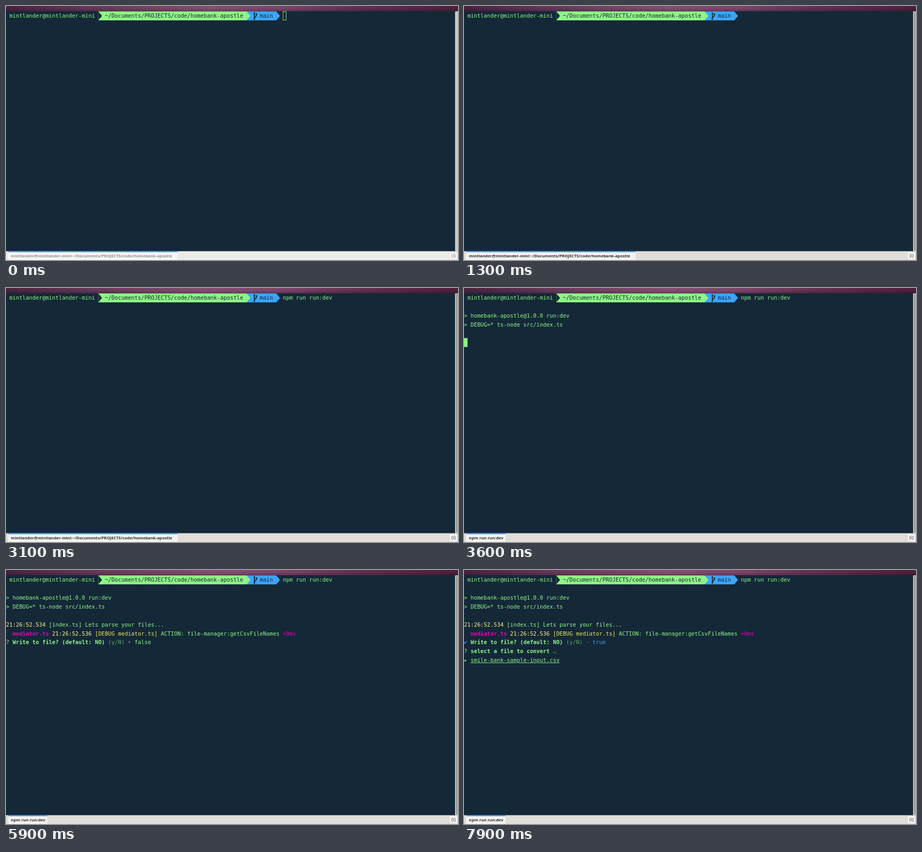
An HTML page that plays this animation: 853 by 480 pixels, repeating every 8 s.

```html
<!DOCTYPE html>
<html lang="en">
<head>
<meta charset="utf-8">
<title>Terminal</title>
<style>
  html, body { margin: 0; width: 100%; height: 100%; overflow: hidden; background: #142838; }
  /* Laid out at 1920 px wide, then scaled to the stage. */
  #stage { position: absolute; top: 0; left: 0; width: 1920px; height: 1081px; overflow: hidden;
    transform: scale(calc(853 / 1920)); transform-origin: 0 0; }
  #stage div, #stage svg { position: absolute; top: 0; left: 0; box-sizing: border-box; }
  #stage #wall { width: 1920px; height: 22px;
    background: linear-gradient(#0000 40%, #0003),
      linear-gradient(90deg, #482340, #6a3a5c 22%, #874c73 45%, #7d456a 60%, #63304f 78%, #4e1f3b); }
  #stage #term { top: 23px; width: 1920px; height: 1020px; background: #142838; color: #8ff586;
    font: 23.25px/38px "DejaVu Sans Mono", monospace; white-space: pre; }
  .row { height: 38px; }
  .seg { height: 38px; color: #142631; }
  .tip { width: 16px; height: 38px; clip-path: polygon(0 0, 100% 50%, 0 100%); }
  #cursor { width: 15px; height: 38px; background: #8ff586; }
  .blur #cursor { background: none; border: 2px solid #8ff586; }
  .time { color: #fff688; }
  .debug { color: #e9e75c; }
  .pink { color: #e600b4; }
  .blue { color: #3ba5ff; }
  .dim { color: #5f9f69; }
  #stage #scroll { left: 1908px; top: 23px; width: 12px; height: 1020px; background: #e6e4e1; }
  #stage #thumb { left: 4px; top: 2px; width: 6px; height: 1016px; border-radius: 3px; background: #858585; }
  .blur #thumb { background: #bebcba !important; }
  #stage #bar { top: 1043px; width: 1920px; height: 38px; background: #e1deda; }
  #stage.blur #bar { background: #edebe8; }
  #stage #tab { left: 9px; height: 38px; padding-left: 12px; border-top: 4px solid #3584d6;
    background: #f3f2f1; color: #2c2c2c; white-space: pre;
    font: bold 17.4px/32px "Open Sans", "Noto Sans", sans-serif; }
  #stage.blur #tab { color: #8e8e8c; background: #f7f6f5; }
  #stage #icon { left: 1883px; top: 2px; color: #666; }
  #stage.blur #icon { color: #999; }
</style>
</head>
<body>
<div id="stage">
  <div id="wall"></div>
  <div id="term">
    <div class="seg" style="left:392px;width:630px;background:#8ff586"></div>
    <div class="seg" style="left:1022px;width:126px;background:#3ba5ff"></div>
    <div class="tip" style="left:392px;background:#142838"></div>
    <div class="tip" style="left:1022px;background:#8ff586"></div>
    <div class="tip" style="left:1148px;background:#3ba5ff"></div>
    <div class="row" style="left:14px">mintlander@mintlander-mini</div>
    <div class="seg" style="left:420px">~/Documents/PROJECTS/code/homebank-apostle</div>
    <div class="seg" style="left:1078px">main</div>
    <svg style="left:1050px" width="18" height="38" fill="none" stroke="#142631" stroke-width="4">
      <path d="M5 5V35M14 9V15Q14 20 5 26"/>
      <path d="M2 7H8M2 32H8M11 11H17" stroke-width="5"/>
    </svg>
    <div id="text"></div>
    <div id="cursor"></div>
  </div>
  <div id="scroll"><div id="thumb"></div></div>
  <div id="bar">
    <div id="tab"></div>
    <svg id="icon" width="35" height="35" fill="none" stroke="currentColor" stroke-width="2">
      <rect x="1" y="1" width="33" height="33" rx="4" fill="#f8f7f6" stroke="#cfccc8"/>
      <path d="M11 25V11H25V25M11 25H15M21 25H25M18 15V22M14.5 18.5H21.5"/>
    </svg>
  </div>
</div>
<script>
const LOOP = 8000, CELL = 14, LINE = 38, PROMPT = 84;
const FOCUS = 300, ENTER = 3300;
const $ = id => document.getElementById(id);
const span = (cls, s) => `<span class="${cls}">${s}</span>`;
const row = (n, s, col = 0) =>
  `<div class="row" style="top:${n * LINE}px;left:${col * CELL}px">${s}</div>`;

const typed = s => row(0, s, PROMPT);
const command = typed("npm run run:dev");
const header = command + row(2, "> homebank-apostle@1.0.0 run:dev") +
  row(3, "> DEBUG=* ts-node src/index.ts");
const log = header +
  row(5, span("time", "21:26:52.534") + " [index.ts] Lets parse your files...") +
  row(6, "  " + span("pink", "<b>mediator.ts</b>") + span("time", " 21:26:52.536 ") +
    span("debug", "[DEBUG mediator.ts]") + " ACTION: file-manager:getCsvFileNames " +
    span("pink", "+0ms"));
const question = (mark, sep, answer) => row(7,
  `${mark} <b>Write to file? (default: NO)</b> ${span("dim", "(y/N) " + sep)} ${answer}`);
const choice = row(8, "? <b>select a file to convert</b> " + span("dim", "…")) +
  row(9, "▸ <u>smile-bank-sample-input.csv</u>");

// Start time, screen text, cursor cell [column, row] or none
const steps = [
  [0, "", [PROMPT, 0]],
  [FOCUS, "", [PROMPT, 0]],
  [1500, typed("clear"), [PROMPT + 5, 0]],
  [2400, command, [PROMPT + 15, 0]],
  [ENTER, command, [0, 1]],
  [3500, header, [0, 5]],
  [5300, log + question("?", "‣", "false")],
  [7300, log + question(span("blue", "✔"), "·", span("blue", "true")) + choice],
];
const blinkStarts = [FOCUS, 1500, 2400, ENTER];
let shown;

function draw() {
  const t = performance.now() % LOOP;
  const step = steps.findLast(s => s[0] <= t);
  if (step !== shown) {
    shown = step;
    const [start, html, cell] = step;
    $("text").innerHTML = html;
    $("stage").className = start < FOCUS ? "blur" : "";
    if (cell) {
      $("cursor").style.left = cell[0] * CELL + "px";
      $("cursor").style.top = cell[1] * LINE + "px";
    }
    const running = start >= ENTER;
    $("tab").textContent = running ? "npm run run:dev"
      : "mintlander@mintlander-mini:~/Documents/PROJECTS/code/homebank-apostle";
    $("tab").style.width = running ? "167px" : "720px";
  }
  const since = t - (blinkStarts.findLast(b => b <= t) ?? t);
  const lit = step[2] && since % 1200 < 600;
  $("cursor").style.visibility = lit ? "visible" : "hidden";
  requestAnimationFrame(draw);
}
draw();
</script>
</body>
</html>
```
